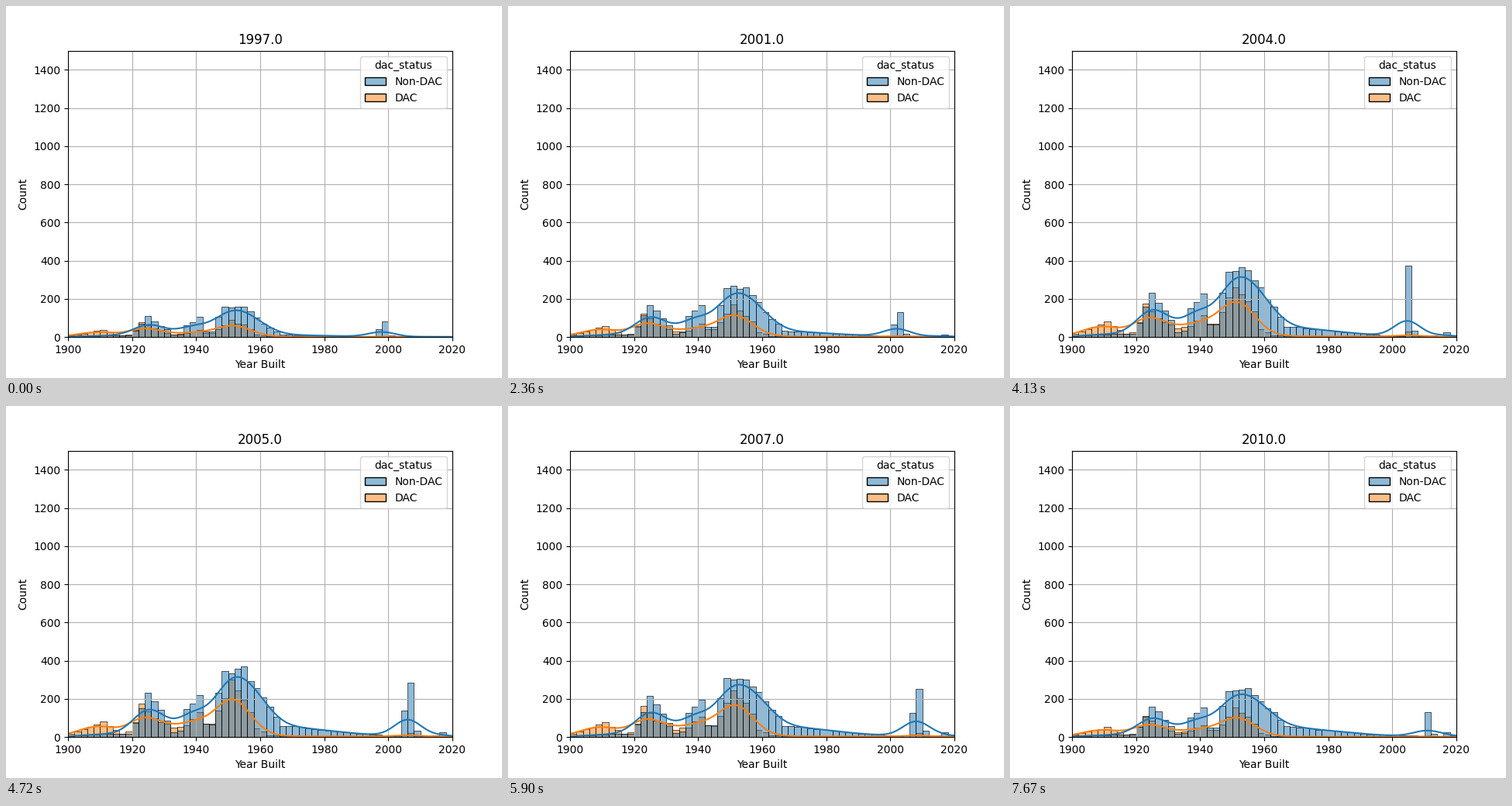
Write a matplotlib script that moves like this. It is 640 px wide and 480 px high and loops after 8000 ms.

```python
import numpy as np
import matplotlib.pyplot as plt
from matplotlib.animation import FuncAnimation
from matplotlib.collections import PolyCollection
from matplotlib.patches import Patch

LOOP, INTERVAL, HOLD = 8000, 40, 590
START, END, BIN = 1900, 2020, 2
FIRST_YEAR, LAST_YEAR = 1997, 2010
BANDWIDTH = 4.0
BLUE, ORANGE = "tab:blue", "tab:orange"

EDGES = np.arange(START, END, BIN)
GRID = np.linspace(START, END, 200)


def shape(*points):
    """Relative height of each bin from a few (year built, height) points."""
    return np.interp(EDGES, *zip(*points))


# Building booms: the twenties, around 1940, and after the war
BLUE_SHAPE = shape((1900, .02), (1914, .06), (1918, .06), (1920, .24),
                   (1924, .75), (1926, .6), (1930, .28), (1932, .08),
                   (1934, .1), (1936, .46), (1940, .72), (1942, .22),
                   (1944, .22), (1946, .74), (1948, 1.1), (1954, 1.15),
                   (1960, .62), (1966, .17), (1980, .1), (1990, .05),
                   (2000, .02), (2014, .02), (2016, .07), (2018, .03))
ORANGE_SHAPE = shape((1900, .1), (1910, .45), (1916, .1), (1918, .15),
                     (1920, .45), (1922, .97), (1926, .55), (1932, .23),
                     (1936, .3), (1940, .6), (1942, .35), (1944, .35),
                     (1946, .64), (1950, 1.4), (1954, 1.0), (1956, .68),
                     (1958, .22), (1962, .05), (1968, .02), (2018, .015))

# Curve heights and newly built homes over the survey years
KEY_YEARS = [1997, 1999, 2001, 2003, 2005, 2007, 2010]
BLUE_LEVEL = [140, 212, 232, 315, 308, 275, 218]
ORANGE_LEVEL = [62, 102, 118, 188, 205, 175, 105]
NEW_HOMES = [82, 136, 128, 222, 276, 246, 84]


def counts(year):
    """Blue and orange bin counts in one survey year."""
    blue_level, orange_level, homes = (
        np.interp(year, KEY_YEARS, key)
        for key in (BLUE_LEVEL, ORANGE_LEVEL, NEW_HOMES))
    # Younger homes gain weight with time, old ones matter more in small years
    drift = 1 + 0.08 * (year - 2003) * np.clip((EDGES - 1956) / 12, 0, 1)
    older = np.where(EDGES < 1930, (140 / orange_level) ** 0.35, 1)
    rng = np.random.default_rng(year)
    jitter = 1 + 0.05 * rng.uniform(-1, 1, (2, EDGES.size))
    blue = blue_level * BLUE_SHAPE * drift * jitter[0]
    orange = orange_level * ORANGE_SHAPE * older * jitter[1]
    # Homes built around the survey year form a moving bump
    for ahead, share in ((0, 0.48), (1, 1), (3, 0.1)):
        i = (year + ahead - START) // BIN
        blue[i] += share * homes
        orange[i] += 0.07 * share * homes
    return blue, orange


def density(heights):
    # Years are whole numbers, so a bin's mean lies half a year past its edge
    z = (GRID[:, None] - EDGES - 0.5) / BANDWIDTH
    kernel = np.exp(-z ** 2 / 2) / (BANDWIDTH * np.sqrt(2 * np.pi))
    return BIN * kernel @ heights


def bar_shapes(heights):
    return [[(x, 0), (x + BIN, 0), (x + BIN, h), (x, h)]
            for x, h in zip(EDGES, heights)]


fig, ax = plt.subplots(figsize=(6.4, 4.8), dpi=100)
ax.set(xlim=(START, END), ylim=(0, 1500), xlabel="Year Built", ylabel="Count")
ax.grid(True)
title = ax.set_title("")


def make_series(color):
    bars = PolyCollection([], facecolors=[(color, 0.5)], edgecolors="black",
                          linewidths=0.45, zorder=1)
    ax.add_collection(bars, autolim=False)
    line, = ax.plot([], [], color=color)
    return bars, line


orange_series = make_series(ORANGE)
blue_series = make_series(BLUE)
ax.legend(handles=[Patch(facecolor=(c, 0.5), edgecolor="black", label=name)
                   for c, name in ((BLUE, "Non-DAC"), (ORANGE, "DAC"))],
          title="dac_status", loc="upper right")


def draw(i):
    step = (i * INTERVAL + INTERVAL - 1) // HOLD
    year = min(FIRST_YEAR + step, LAST_YEAR)
    title.set_text(f"{year:.1f}")
    for (bars, line), heights in zip((blue_series, orange_series), counts(year)):
        bars.set_verts(bar_shapes(heights))
        line.set_data(GRID, density(heights))


anim = FuncAnimation(fig, draw, frames=LOOP // INTERVAL, interval=INTERVAL,
                     init_func=lambda: draw(0), repeat=True, repeat_delay=0)
plt.show()
```
